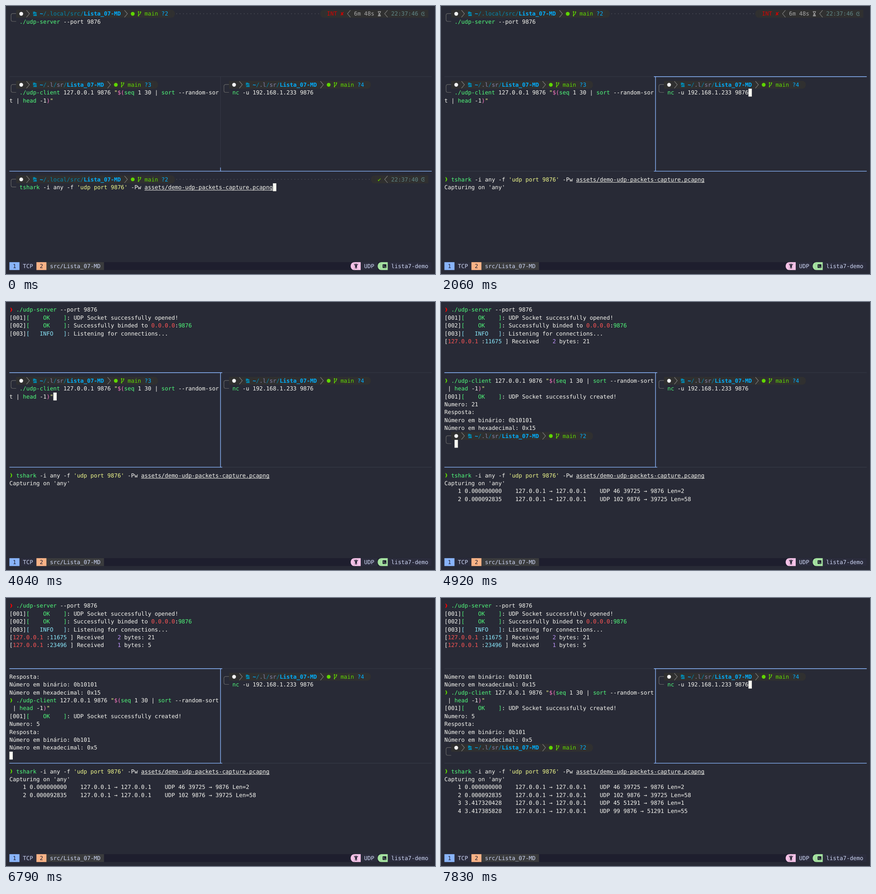
An HTML page that plays this animation: 947 by 591 pixels, repeating every 8000 ms.

```html
<!DOCTYPE html>
<html lang="pt">
<head>
<meta charset="utf-8">
<title>UDP terminal demo</title>
<style>
html, body { margin: 0; width: 100%; height: 100%; overflow: hidden; background: #282a36; }
svg { display: block; width: 947px; height: 591px; }
text { font: 12.388px "DejaVu Sans Mono", "Noto Sans Mono", monospace; fill: #f8f8f2; white-space: pre; text-rendering: geometricPrecision; }
.g { fill: #50fa7b } .y { fill: #f1fa8c } .p { fill: #ff79c6 } .c { fill: #8be9fd }
.v { fill: #bd93f9 } .r { fill: #ff5555 } .x { fill: #d70000 } .f { fill: #ff0000 }
.t { fill: #0087af } .b { fill: #00afff; font-weight: bold } .q { fill: #00afff }
.m { fill: #8787af } .e { fill: #5fd700 } .n { fill: #5faf00 } .k { fill: #a8a8a8 }
.z { fill: #5f8787 } .d { fill: #5c5e66 } .s { fill: #cdd6f4 } .i { fill: #1e1e2e }
</style>
</head>
<body>
<svg id="stage" viewBox="0 0 947 591"></svg>
<script>
const LOOP = 8000, CW = 7.458, RH = 17.39, MID = 8.2;
const BLUE = '#89b4fa', DIM = '#353846', PILL = '#303030', DARK = '#1e1e2e';
const DIR = 'Lista_07-MD';
const stage = document.getElementById('stage');

const X = c => 7.5 + c * CW;
const Y = r => 8.4 + r * RH;
const rect = (x, y, w, h, fill) => `<rect x="${x}" y="${y}" width="${w}" height="${h}" fill="${fill}"/>`;
const cells = (c, r, n, fill) => rect(X(c), Y(r), n * CW, RH, fill);
const line = (d, color, w = 1.4) => `<path d="${d}" fill="none" stroke="${color}" stroke-width="${w}"/>`;
const shape = (d, fill) => `<path d="${d}" fill="${fill}"/>`;
const dot = (c, r, fill) => `<circle cx="${X(c + .5)}" cy="${Y(r) + 8.8}" r="4.2" fill="${fill}"/>`;

// Markup: plain text with {class:text} runs
const RUN = /\{(\w):([^}]*)\}|[^{]+/g;
const plain = s => s.replace(/\{\w:([^}]*)\}/g, '$1');

function write(s, col, row) {
  let out = '', c = col;
  for (const [all, cls, body] of s.matchAll(RUN)) {
    const str = cls ? body : all;
    for (const w of str.matchAll(/\S+/g)) {
      const x = X(c + w.index);
      if (w[0] === '❱') {
        const y = Y(row);
        out += `<path class="${cls}" d="M${x + 1.8} ${y + 4}h1.7q2.6 2.3 2.6 4.7t-2.6 4.7h-1.7q1.9-2.3 1.9-4.7t-1.9-4.7z"/>`;
      } else {
        out += `<text class="${cls || ''}" x="${x}" y="${Y(row) + 13}">${w[0]}</text>`;
      }
    }
    if (cls === 'u') out += rect(X(c), Y(row) + 14.7, str.length * CW, 1, '#f8f8f2');
    c += str.length;
  }
  return out;
}

// Half-round pill end; side 1 = right, -1 = left
function cap(c, r, side, fill) {
  const x = X(side > 0 ? c : c + 1);
  return shape(`M${x} ${Y(r)}a${CW} ${RH / 2} 0 0 ${side > 0 ? 1 : 0} 0 ${RH}z`, fill);
}

function chevron(c, r, side = 1) {
  const x = X(c + (side > 0 ? 0 : 1)) + side * .4, y = Y(r);
  return line(`M${x} ${y + 1}l${side * 6.6} 7.7l${-side * 6.6} 7.7`, '#808080', 1.1);
}

function folder(c, r) {
  const x = X(c), y = Y(r);
  return shape(`M${x} ${y + 4}h4.4l1.2 1.7h2.2v3h-4.6l-3.2 2.2z`, '#0087af')
    + shape(`M${x + .4} ${y + 12.2}l3.3-2.5h4.5v3.9h-7.8z`, '#0087af');
}

function branch(c, r) {
  const x = X(c) + 1.6, y = Y(r);
  return line(`M${x} ${y + 4}v9.5M${x} ${y + 10.6}q4.5 0 4.5-5`, '#5fd700', 1.3)
    + [[0, 4.6], [4.5, 5], [0, 13]].map(([a, b]) => `<circle cx="${x + a}" cy="${y + b}" r="1.4" fill="#5fd700"/>`).join('');
}

function clock(c, r) {
  const x = X(c + .5), y = Y(r) + 8.8;
  return line(`M${x + 3} ${y - 2.6}a4 4 0 1 0 0 5.2M${x} ${y - 2.2}v2.4h2.6`, '#5f8787', 1.1);
}

function hourglass(c, r) {
  const x = X(c) + .4, y = Y(r);
  return line(`M${x} ${y + 4}h6.8M${x} ${y + 13.6}h6.8M${x + 1} ${y + 4}q0 3 2.4 4.8q-2.4 1.8-2.4 4.8M${x + 5.8} ${y + 4}q0 3-2.4 4.8q2.4 1.8 2.4 4.8`, '#a8a8a8', 1.2)
    + shape(`M${x + 1.2} ${y + 13.5}l2.2-2.6l2.2 2.6z`, '#a8a8a8');
}

function prompt(col, row, long, n) {
  const path = long ? '{b:~}{t:/.local/src/}' : '{b:~}{t:/}{m:.l}{t:/}{m:sr}{t:/}';
  const end = col + 9 + plain(path).length + DIR.length;
  const y = Y(row) + MID;
  return line(`M${X(col + 2)} ${y}H${X(col + .5) + 4}q-4 0-4 4V${y + RH - 4}q0 4 4 4H${X(col + 2)}`, '#666', 1.2)
    + cells(col + 2, row, end + 13 - col, PILL).replace(/width="[^"]+"/, `width="${(end + 15 - col - 2) * CW}"`)
    + cap(end + 15, row, 1, PILL)
    + dot(col + 3, row, '#f4f4f4') + chevron(col + 5, row) + folder(col + 7, row)
    + write(`${path}{b:${DIR}}`, col + 9, row)
    + chevron(end + 1, row) + dot(end + 3, row, '#5fd700') + branch(end + 5, row)
    + write(`{e:main} {q:?${n}}`, end + 7, row);
}

function rightPrompt(row, failed) {
  const start = failed ? 92 : 107;
  let out = cap(start, row, -1, PILL) + cells(start + 1, row, 123 - start, PILL);
  for (let c = 49; c < start; c++) out += `<circle cx="${X(c + .5)}" cy="${Y(row) + 8.7}" r=".8" fill="#5c5e66"/>`;
  out += failed
    ? write('{x:INT ✘}', 94, row) + chevron(100, row, -1) + write('{k:6m 48s}', 102, row) + hourglass(109, row)
    : write('{n:✔}', 109, row);
  return out + chevron(111, row, -1) + write(`{z:22:37:${failed ? 46 : 40}}`, 113, row) + clock(122, row);
}

// "@n" is a prompt line with n untracked files, "@@n" its long form
function pane(lines, col, row, active) {
  let out = '';
  lines.forEach((s, i) => {
    const m = s.match(/^(@+)(\d)$/);
    out += m ? prompt(col, row + i, m[1].length > 1, m[2]) : write(s, col, row + i);
  });
  if (active) {
    const last = lines.length - 1;
    out += cells(col + plain(lines[last]).length, row + last, 1, '#f8f8f2');
  }
  return out;
}

const serverCmd = '{g:./udp-server} --port 9876';
const sharkCmd = "{g:tshark} -i any -f {y:'udp port 9876'} -Pw {u:assets/demo-udp-packets-capture.pcapng}";
const clientCmd = '{g:./udp-client} 127.0.0.1 9876 {y:"}{p:$(}{g:seq} 1 30 | {g:sort} --random-sor';
const clientTail = '| {g:head} -1{p:)}{y:"}';
const okLog = (n, msg) => `[00${n}]{g:[    OK    ]}: UDP Socket successfully ${msg}!`;
const received = (port, len, val) => `[{r:127.0.0.1} :{c:${port}} ] Received    {v:${len}} bytes: ${val}`;
const packet = (n, time, info) => `    ${n} ${time}    127.0.0.1 → 127.0.0.1    UDP ${info}`;
const typed = ['@3', '   ' + clientCmd, 't ' + clientTail];
const answer = n => [
  '{e:❱} ' + clientCmd + 't', ' ' + clientTail, okLog(1, 'created'), 'Numero: ' + n, 'Resposta:',
  'Número em binário: 0b' + n.toString(2), 'Número em hexadecimal: 0x' + n.toString(16)
];

function topLines(t) {
  if (t < 2910) return ['@@2', '   ' + serverCmd];
  const out = ['{f:❱} ' + serverCmd, okLog(1, 'opened'),
    '[002]{g:[    OK    ]}: Successfully binded to {r:0.0.0.0}:{g:9876}',
    '[003]{c:[   INFO   ]}: Listening for connections...'];
  if (t >= 4700) out.push(received(11675, 2, 21));
  if (t >= 6790) out.push(received(23496, 1, 5));
  return [...out, ''];
}

function leftLines(t) {
  if (t < 4700) return typed;
  const out = answer(21);
  if (t < 6260) out.push('@2', '   ');
  else if (t < 6790) out.push('@2', ...typed.slice(1));
  else out.push(...answer(5), ...(t < 6830 ? [''] : ['@2', '   ']));
  return out.slice(-11);
}

function bottomLines(t) {
  if (t < 890) return ['@@2', '   ' + sharkCmd];
  const out = ['{e:❱} ' + sharkCmd];
  if (t >= 1020) out.push("Capturing on 'any'");
  if (t >= 4920) out.push(packet(1, '0.000000000', '46 39725 → 9876 Len=2'), packet(2, '0.000092835', '102 9876 → 39725 Len=58'));
  if (t >= 6880) out.push(packet(3, '3.417320428', '45 51291 → 9876 Len=1'));
  if (t >= 7050) out.push(packet(4, '3.417385828', '99 9876 → 51291 Len=55'));
  return [...out, ''];
}

function borders(focus) {
  const y1 = Y(8) + MID, y2 = Y(20) + MID, x = X(62.5) - .1;
  const across = (y, a, b) => `M${X(a)} ${y}H${X(b)}`;
  const active = {
    top: across(y1, 0, 125) + `M${x} ${y1}V${Y(9)}`,
    bottom: across(y2, 0, 125) + `M${x} ${Y(20)}V${y2}`,
    left: across(y1, 0, 63) + across(y2, 0, 63) + `M${x} ${y1}V${y2}`,
    right: across(y1, 62, 125) + across(y2, 62, 125) + `M${x} ${y1}V${y2}`
  };
  return line(across(y1, 0, 125) + across(y2, 0, 125) + `M${x} ${y1}V${y2}`, DIM, 1.1) + line(active[focus], BLUE);
}

function statusBar() {
  const r = 32, y = Y(r), tab = '#2b2c3c', px = X(102.6), gx = X(110.45);
  return cells(0, r, 125, DARK)
    + cells(0, r, 3, BLUE) + cells(3, r, 5, tab) + cells(8, r, 3, '#fab387') + cells(11, r, 17, '#3a3b3d')
    + write('{i:1}  {s:TCP}  {i:2}  {s:src/' + DIR + '}', 1, r)
    + cap(101, r, -1, '#f5c2e7') + cells(102, r, 2, '#f5c2e7') + cells(104, r, 5, tab)
    + `<circle cx="${px}" cy="${y + 4.7}" r="1.5" fill="${DARK}"/>`
    + line(`M${px - 4} ${y + 4}l2.6 3.3h2.8l2.6-3.3`, DARK, 1.5)
    + shape(`M${px - 1.9} ${y + 6.8}h3.8v7.2h-1.4v-3h-1v3h-1.4z`, DARK)
    + cap(109, r, -1, '#a6e3a1') + cells(110, r, 2, '#a6e3a1') + cells(112, r, 13, tab)
    + `<rect x="${gx}" y="${y + 4.6}" width="8.4" height="8.2" rx="1" fill="${DARK}"/>`
    + line(`M${gx + 1.6} ${y + 6.6}l2 2l-2 2M${gx + 4.4} ${y + 11}h2.6`, '#a6e3a1', 1)
    + write('{s:UDP}', 105, r) + write('{s:lista7-demo}', 113, r);
}

const focusAt = [[0, 'bottom'], [2060, 'right'], [2290, 'top'], [3680, 'right'], [4040, 'left'], [7830, 'right']];
const cuts = [0, 890, 1020, 2060, 2290, 2910, 3680, 4040, 4700, 4920, 6260, 6790, 6830, 6880, 7050, 7830];
let shown = -1;

function draw(t) {
  const at = cuts.filter(c => c <= t).pop();
  if (at === shown) return;
  shown = at;
  const focus = focusAt.filter(f => f[0] <= t).pop()[1];
  stage.innerHTML = rect(0, 0, 947, 591, '#282a36')
    + borders(focus)
    + pane(topLines(t), 0, 0, focus === 'top')
    + (t < 2910 ? rightPrompt(0, true) : '')
    + pane(leftLines(t), 0, 9, focus === 'left')
    + pane(['@4', '   {g:nc} -u 192.168.1.233 9876'], 63, 9, focus === 'right')
    + pane(bottomLines(t), 0, 21, focus === 'bottom')
    + (t < 890 ? rightPrompt(21, false) : '')
    + statusBar();
}

const begin = performance.now();
function tick() {
  draw((performance.now() - begin) % LOOP);
  requestAnimationFrame(tick);
}
tick();
</script>
</body>
</html>
```
